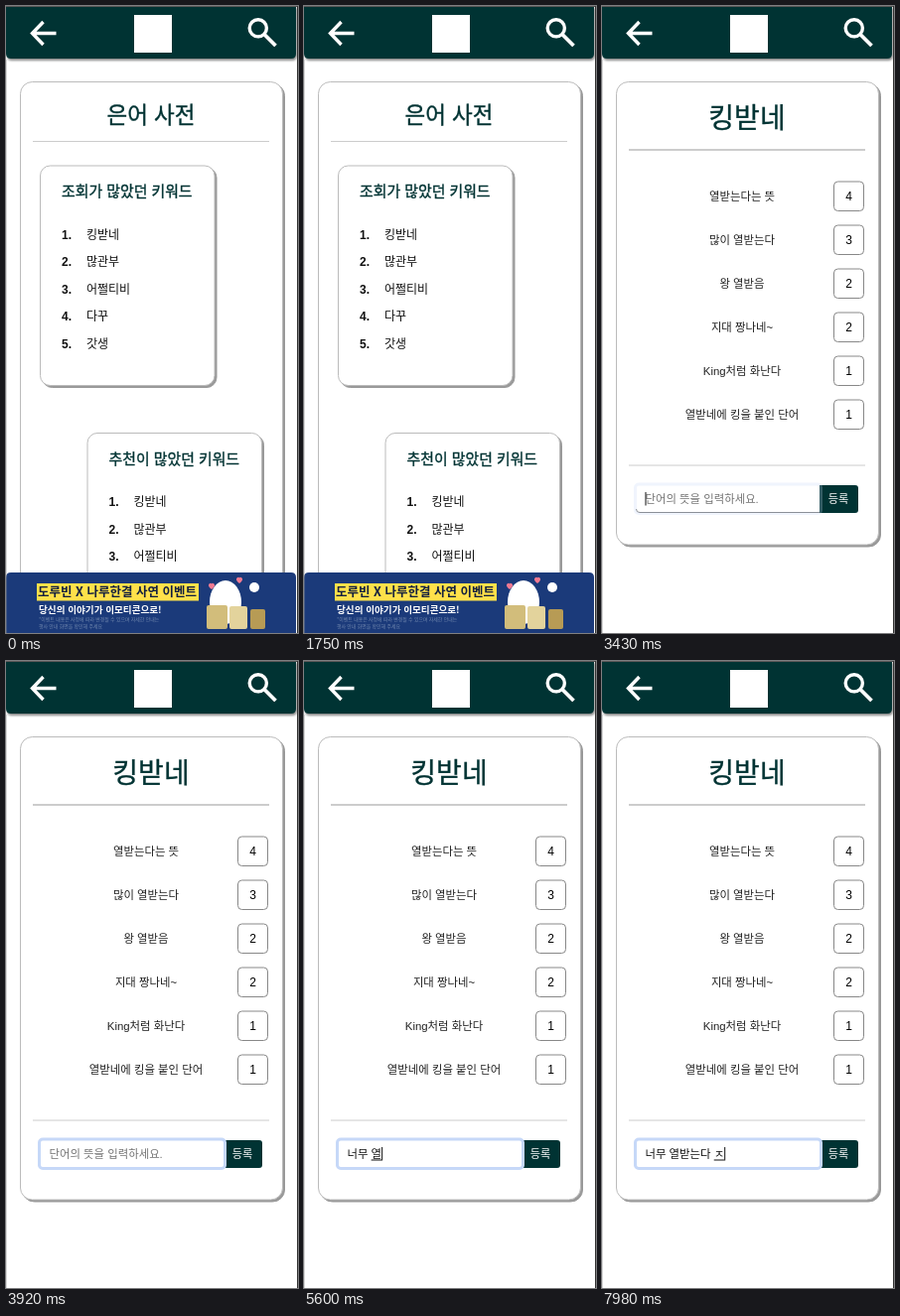
Write an HTML page that moves like this. It is 294x632 px and loops after 8000 ms.

```html
<!DOCTYPE html>
<html lang="ko">
<head>
<meta charset="utf-8">
<title>은어 사전</title>
<style>
  html, body { margin: 0; width: 100%; height: 100%; overflow: hidden; background: #fff; }
  svg { display: block; width: 294px; height: 632px; }
  text { font-family: "Liberation Sans", "Noto Sans CJK KR", "Noto Sans CJK", sans-serif; white-space: pre; }
  .card { fill: #fff; stroke: #bbb; filter: drop-shadow(2.5px 2.5px .7px #999); }
  .title { stroke: #033; stroke-width: .35px; }
  .ad text { font-family: "Noto Sans CJK KR", "Noto Sans CJK", sans-serif; }
</style>
</head>
<body>
<svg viewBox="0 0 294 632">
  <g id="list"></g>
  <g id="word"></g>
  <g id="field">
    <rect id="ring" x="33.5" y="482" width="187" height="29.5" rx="3.5" fill="#fff" stroke="#c6d8f8" stroke-width="3"/>
    <text id="hint" x="43.5" y="500.5" font-size="11.4" fill="#757575">단어의 뜻을 입력하세요.</text>
    <text id="typed" x="43.5" y="500.5" font-size="11.4" fill="#111"></text>
    <rect id="under" y="502.5" height="1" fill="#111"/>
    <rect id="caret" y="490" width="1" height="13.5" fill="#111"/>
  </g>
  <path d="M0 0H292V48Q292 53 287 53H5Q0 53 0 48Z" fill="#033" style="filter:drop-shadow(1px 2px 1px #888)"/>
  <path d="M37.5 16 26.5 27.5 37.5 39M27 27.5H50.5" fill="none" stroke="#fff" stroke-width="3.4"/>
  <rect x="129" y="9" width="38" height="38" fill="#fff"/>
  <g fill="none" stroke="#fff" stroke-width="3.4">
    <circle cx="253.8" cy="22.3" r="8.6"/>
    <path d="M260 28.5 271.5 40" stroke-width="3.8"/>
  </g>
  <path d="M0 .5H294" stroke="#555"/>
  <path d="M293.5 0V632" stroke="#333"/>
  <path d="M.25 54V632" stroke="#999" stroke-width=".5"/>
</svg>
<script>
const $ = id => document.getElementById(id);
const DARK = '#033';
const LOOP = 8000, OPEN = 2030, FOCUS = 3430;

// Text centred vertically on y
const text = (s, x, y, size, fill = '#111', more = '') =>
  `<text x="${x}" y="${y + size * 0.37}" font-size="${size}" fill="${fill}" ${more}>${s}</text>`;
const mid = 'text-anchor="middle"';
const title = 'class="title"';
const card = (x, y, w, h, r) =>
  `<rect class="card" x="${x}" y="${y}" width="${w}" height="${h}" rx="${r}"/>`;
const line = (y, w = 1) => `<path d="M27 ${y}H265" stroke="#ccc" stroke-width="${w}"/>`;
const heart = (x, y) =>
  `<path d="M${x} ${y}q-5-4-2-6 2-1 2 1 0-2 2-1 3 2-2 6" fill="#f27a92"/>`;

const ranking = (x, y, name, words) =>
  card(x, y, 175.5, 221.5, 10) + text(name, x + 21.5, y + 25.7, 14.9, DARK, title) +
  words.map((w, i) => {
    const cy = y + 69.3 + i * 27.5;
    return text(i + 1 + '.', x + 21.5, cy, 12, '#111', 'font-weight="bold"') +
      text(w, x + 46.5, cy, 12);
  }).join('');

const words = ['킹받네', '많관부', '어쩔티비', '다꾸', '갓생'];
const ad = `<g class="ad">
  <path d="M0 632V576Q0 571 5 571H287Q292 571 292 576V632Z" fill="#1b3a7a"/>
  <rect x="31" y="582" width="163" height="17.5" fill="#ffe14a"/>` +
  text('도루빈 X 나루한결 사연 이벤트', 112, 590.5, 12.5, '#14213f', mid + ' font-weight="900"') +
  text('당신의 이야기가 이모티콘으로!', 33, 608, 9.6, '#fff', 'font-weight="bold"') +
  text('*이벤트 내용은 사정에 따라 변경될 수 있으며 자세한 안내는', 33, 618.5, 4.9, '#6f86ad') +
  text('행사 안내 화면을 확인해 주세요', 33, 625, 4.9, '#6f86ad') +
  `<ellipse cx="221" cy="601" rx="16" ry="22" fill="#fff"/>
  <rect x="202" y="604" width="21" height="24" rx="2" fill="#d2bd7b"/>
  <rect x="225" y="605" width="18" height="23" rx="2" fill="#e3d39c"/>
  <rect x="246" y="608" width="15" height="20" rx="2" fill="#b79b55"/>
  <circle cx="250" cy="586" r="5" fill="#fff"/>` +
  heart(207, 588) + heart(235, 582) + '</g>';

$('list').innerHTML = card(14.5, 76.5, 264, 600, 12) +
  text('은어 사전', 146, 109.5, 22.5, DARK, mid + title) + line(136.5) +
  ranking(34.5, 161, '조회가 많았던 키워드', words) +
  ranking(82, 430.5, '추천이 많았던 키워드', words) + ad;

const meanings = [['열받는다는 뜻', 4], ['많이 열받는다', 3], ['왕 열받음', 2],
  ['지대 짱나네~', 2], ['King처럼 화난다', 1], ['열받네에 킹을 붙인 단어', 1]];

$('word').innerHTML = card(14.5, 76.5, 264, 466.5, 12) +
  text('킹받네', 146, 113, 28, DARK, mid + title) + line(145, 2) + line(463) +
  meanings.map(([s, votes], i) => {
    const y = 191.5 + i * 44;
    return text(s, 141, y, 11.4, '#222', mid) +
      `<rect x="233.5" y="${y - 14.5}" width="30" height="29.5" rx="4" fill="#fff" stroke="#888"/>` +
      text(votes, 248.5, y + .3, 12, '#000', mid);
  }).join('') +
  `<path d="M34.5 507Q34.5 510.5 38 510.5H220" fill="none" stroke="#777"/>
  <path d="M219 483H255Q258 483 258 486V508Q258 511 255 511H219Z" fill="${DARK}"/>` +
  text('등록', 238, 497, 11.2, '#fff', mid);

// Keystrokes: time, committed text, syllable being composed
const keys = [
  [4760, '', 'ㄴ'], [4900, '', '너'], [4970, '', '넘'], [5110, '너', '무'],
  [5320, '너무 ', ''], [5390, '너무 ', 'ㅇ'], [5530, '너무 ', '여'], [5600, '너무 ', '열'],
  [5740, '너무 ', '엷'], [5880, '너무 열', '바'], [6090, '너무 열', '받'],
  [6230, '너무 열받', 'ㄴ'], [6580, '너무 열받', '느'], [6720, '너무 열받', '는'],
  [6930, '너무 열받는', 'ㄷ'], [7070, '너무 열받는', '다'],
  [7840, '너무 열받는다 ', ''], [7910, '너무 열받는다 ', 'ㅈ']];
const caretOff = [[3920, 4480], [7560, 7840]];

const show = (id, on) => $(id).style.display = on ? '' : 'none';
const width = s => {
  $('typed').textContent = s;
  return s ? $('typed').getComputedTextLength() : 0;
};

function draw(t) {
  show('list', t < OPEN);
  show('word', t >= OPEN);
  show('field', t >= OPEN);
  const [, done, part] = keys.findLast(k => k[0] <= t) || [0, '', ''];
  const start = width(done), end = width(done + part);
  show('hint', !(done + part));
  $('under').setAttribute('x', 43.5 + start);
  $('under').setAttribute('width', end - start);
  $('caret').setAttribute('x', 43.5 + end);
  show('caret', t >= FOCUS && !caretOff.some(([a, b]) => t >= a && t < b));
  $('ring').style.opacity = Math.min(1, Math.max(0, (t - FOCUS + 50) / 200));
}

function tick() {
  draw(performance.now() % LOOP);
  requestAnimationFrame(tick);
}
tick();
</script>
</body>
</html>
```
